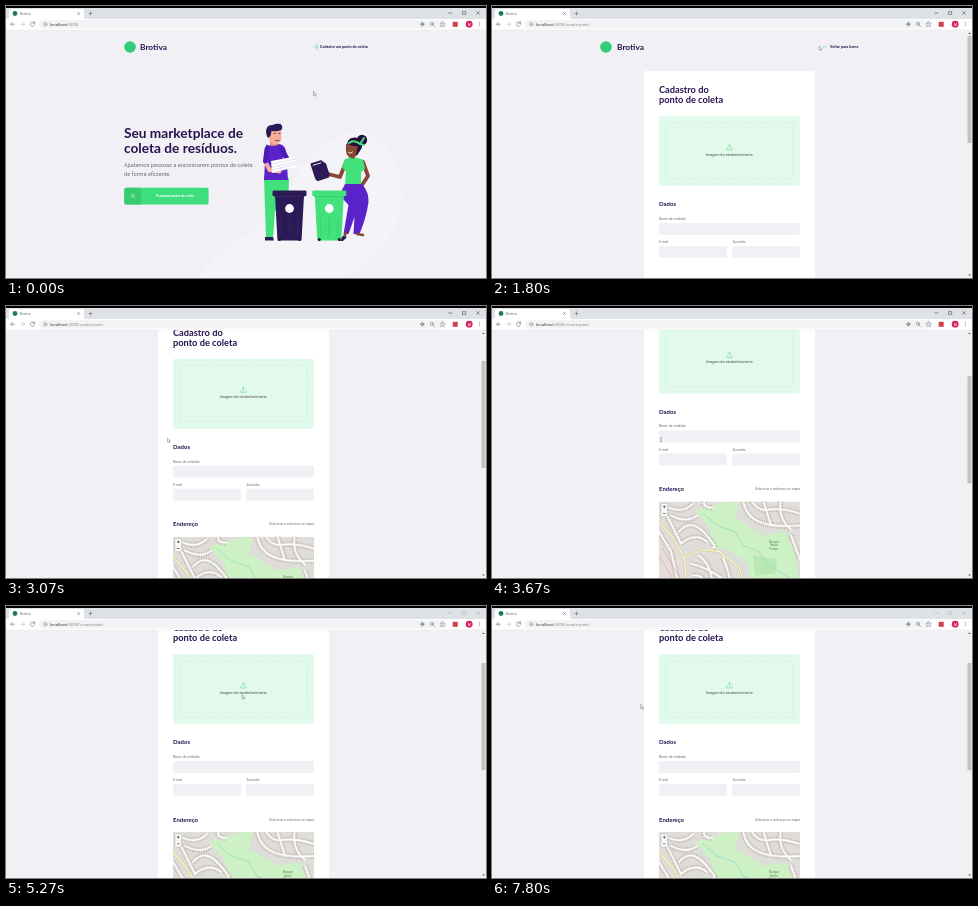
Recreate the animation shown at these times as an HTML page. Size 480 by 272 pixels, loop 8 s.

```html
<!DOCTYPE html>
<html lang="pt-BR">
<head>
<meta charset="utf-8">
<title>Brotiva</title>
<style>
  html, body { margin: 0; width: 100%; height: 100%; overflow: hidden; background: #f0f0f5; }
  #stage { display: block; width: 100%; height: 100%; }
  text { font-family: Roboto, sans-serif; }
  .title, .title text { font-family: Lato, sans-serif; font-weight: 700; fill: #27134f; }
  .label { font-size: 3.3px; fill: #6c6c80; }
  .link { font-size: 3.7px; font-weight: 700; fill: #322153; }
  .line { fill: none; stroke-linecap: round; stroke-linejoin: round; }
  .field { fill: #f0f0f5; }
</style>
</head>
<body>
<svg id="stage" viewBox="0 0 480 272">
  <rect width="480" height="272" fill="#f0f0f5"/>

  <g id="home">
    <path d="M194 272C205 245 240 236 265 205S305 132 352 126C385 128 405 175 392 215C380 245 352 262 338 272Z" fill="#f4f4f8"/>
    <circle cx="124" cy="41" r="5.8" fill="#34cb79"/>
    <text class="title" x="134" y="44" font-size="8.3">Brotiva</text>
    <path class="line" d="M307.5 41h3.5m-1.3-1.3 1.3 1.3-1.3 1.3M310 38.7h1.8v4.6H310" stroke="#6fd8a0" stroke-width=".5"/>
    <text class="link" x="314" y="42.3">Cadastre um ponto de coleta</text>
    <g class="title" font-size="13.7">
      <text x="118" y="132.4">Seu marketplace de</text>
      <text x="118" y="146.8">coleta de resíduos.</text>
    </g>
    <g font-size="5.63" fill="#6c6c80">
      <text x="118" y="161">Ajudamos pessoas a encontrarem pontos de coleta</text>
      <text x="118" y="170">de forma eficiente.</text>
    </g>
    <rect x="118.3" y="181.8" width="84.3" height="16.6" rx="2" fill="#3fde7c"/>
    <path d="M120.3 181.8H135v16.6h-14.7a2 2 0 0 1-2-2v-12.6a2 2 0 0 1 2-2" fill="#39cb70"/>
    <g class="line" stroke="#e4fbee" stroke-width=".5"><circle cx="126.4" cy="189.7" r="1.4"/><path d="m127.5 190.8 1.2 1.2"/></g>
    <text x="169" y="191.3" font-size="3.1" font-weight="700" fill="#fff" text-anchor="middle">Pesquisar pontos de coleta</text>

    <g id="man">
      <path d="M258 172h25l-1 32-13 1-2 27h-7Z" fill="#43e17b"/>
      <path d="M259 231h8l1 3.5h-9Z" fill="#2c1a56"/>
      <path d="M264 132h8v9h-8Z" fill="#e8937f"/>
      <path d="M262 123q6-3 13 0l.5 10q-2 6-6 5.500-5-.5-6.500-6.500Z" fill="#f8ae98"/>
      <path d="M262 132q-3-5-1.500-9 1-4 6-4 4-2 8-1 3 2 1 6-5 2-10 1l-1 5Z" fill="#2c1a56"/>
      <path class="line" d="m268 127.500 1.500-.2m3 0 1.500 .1m-4.500 7q2 1 3.500 0" stroke="#2c1a56" stroke-width=".7"/>
      <path d="M260 138.500q8 3 13-.5 6 1 7 7l2 29h-24l1-18Z" fill="#5a22c9"/>
      <path class="line" d="m259.500 156 4 8 10 1.500m5-14 8 7" stroke="#f8ae98" stroke-width="4"/>
      <path class="line" d="m261 143-1.500 12m16-12 5 9" stroke="#4f1bb7" stroke-width="5"/>
      <path d="m265 155 24-4.500 3 10-26 6.500Z" fill="#fff"/>
      <path class="line" d="m266 158 24-5m-24 8 25-5m-25 8 25-6" stroke="#bfc3df" stroke-width=".5"/>
    </g>

    <g id="woman">
      <circle cx="356" cy="134" r="5.2" fill="#24113f"/>
      <path d="M341 142q-1-11 8-10.500 9 .5 7 10l-5 8h-5Z" fill="#24113f"/>
      <path d="M342 138q5 3 10 2l-2 8-2 7h-4.500l-.5-4q-4-2-3-13Z" fill="#874934"/>
      <path class="line" d="M343 137q5-4 11 1l4-6m-4 6 4 1" stroke="#43e17b" stroke-width="2"/>
      <path class="line" d="M342.500 146.500q2 2 4-.5" stroke="#fff" stroke-width=".9"/>
      <path class="line" d="m340 156-6 15-12-3m35-12 5 14-6 9" stroke="#874934" stroke-width="3.8"/>
      <path d="m339 153 5-1.500q3 2 6 0l7 2 2 9-4 4v14h-16l1-15-4-4Z" fill="#43e17b"/>
      <path d="M339 178h17q7 8 6.500 18-2 15-9 32h-6l1-17-6 17h-5l5-29-9-10Z" fill="#5a22c9"/>
      <path class="line" d="m340 227-2 4m13-3 6 1" stroke="#874934" stroke-width="2.600"/>
      <path d="m337 230 4 1-4 4h-5Z" fill="#2c1a56"/>
      <g transform="rotate(-18 314 165)" fill="#2c1a56">
        <rect x="307" y="158" width="15" height="16" rx="3"/>
        <path class="line" d="M308 160v-4h10l3 5" stroke="#2c1a56" stroke-width="2"/>
      </g>
    </g>
    <g id="bins"></g>
  </g>

  <g id="form">
    <path class="line" d="M40 24Q75 90 52 180T85 272M360 30Q395 110 375 175T430 272" stroke="#f3f3f7" stroke-width=".6"/>
    <g id="page">
      <circle cx="114" cy="41" r="5.8" fill="#34cb79"/>
      <text class="title" x="125" y="44" font-size="8.3">Brotiva</text>
      <path class="line" d="M334.500 41h-3.400m1.500-1.500-1.500 1.500 1.500 1.500" stroke="#6fd8a0" stroke-width=".5"/>
      <text class="link" x="338" y="42.3">Voltar para home</text>

      <rect x="152" y="65" width="171" height="500" rx="2" fill="#fff"/>
      <g class="title" font-size="9.25">
        <text x="167" y="87.4">Cadastro do</text>
        <text x="167" y="97">ponto de coleta</text>
      </g>
      <rect x="167" y="110" width="141" height="70" rx="2" fill="#e1faec"/>
      <rect x="174" y="117" width="127" height="56" rx="2" fill="none" stroke="#96e2b8" stroke-width=".3" stroke-dasharray="1.2 .7"/>
      <path class="line" d="M235 142v2h5v-2m-2.500 .5v-3.800m-1.400 1.400 1.400-1.400 1.400 1.400" stroke="#4ecb79" stroke-width=".45"/>
      <text x="237.3" y="149.8" font-size="3.7" fill="#444" text-anchor="middle">Imagem do estabelecimento</text>

      <g class="title" font-size="6">
        <text x="167" y="200.4">Dados</text>
        <text x="167" y="277.6">Endereço</text>
      </g>
      <g class="label">
        <text x="167" y="213.9">Nome da entidade</text>
        <text x="167" y="237.2">E-mail</text>
        <text x="240.4" y="237.2">Zunovibe</text>
        <text x="308" y="276.6" text-anchor="end">Selecione o endereço no mapa</text>
      </g>
      <rect class="field" x="167" y="217" width="141" height="11.7" rx="1.5"/>
      <rect class="field" x="167" y="240" width="68" height="11.7" rx="1.5"/>
      <rect class="field" x="240" y="240" width="68" height="11.7" rx="1.5"/>

      <svg x="167" y="288" width="141" height="84" overflow="hidden">
        <rect width="141" height="84" fill="#dfddd9"/>
        <path d="M0 44 12 38 36 84H0Z" fill="#e6dcd9"/>
        <path d="M36 10 62 2 70 0H80L76 16 92 26 104 34 126 30 136 50 141 84H92L88 62 72 50 56 46 50 26Z" fill="#cdf0c4"/>
        <path d="M94 54 118 58 116 72 96 74Z" fill="#b9e8b2"/>
        <g id="streets" class="line"></g>
        <path class="line" d="M44 12 58 24 76 30 84 44 100 50 108 62 130 76" stroke="#8fdccb" stroke-width=".8"/>
        <g class="line">
          <path id="avenue" d="M-2 18 14 36 25 56 28 84M25 56 44 48 60 50 80 66 86 84" stroke="#cfcaa0" stroke-width="2.2"/>
          <use href="#avenue"/>
          <path d="M-2 18 14 36 25 56 28 84M25 56 44 48 60 50 80 66 86 84" stroke="#f5f3c8" stroke-width="1.5"/>
        </g>
        <path class="line" d="M0 54 18 84M3 46 23 80" stroke="#c7a9a8" stroke-width=".6"/>
        <g font-size="3" fill="#4d8a55" text-anchor="middle">
          <text x="115" y="41">Bosque</text><text x="115" y="44.500">Norte</text><text x="115" y="48">Parque</text>
        </g>
        <rect x="2" y="2" width="6.6" height="13" rx="1" fill="#fff" stroke="#aaa" stroke-width=".5"/>
        <path class="line" d="M2 8.500h6.600" stroke="#ccc" stroke-width=".3"/>
        <path class="line" d="M4.200 5.200h2.200m-1.100-1.100v2.200M4.200 11.800h2.200" stroke="#222" stroke-width=".6"/>
      </svg>
    </g>
    <rect x="475" y="24" width="5" height="248" fill="#f1f1f1"/>
    <rect id="thumb" x="475.5" width="4" height="107" fill="#c1c1c1"/>
    <path d="m476.200 28 1.300-1.600 1.300 1.600Zm0 240.500 1.300 1.600 1.300-1.600Z" fill="#505050"/>
  </g>

  <g id="browser">
    <rect width="480" height="13" fill="#dee1e6"/>
    <rect width="480" height="2" fill="#000"/>
    <path d="M1 13q2 0 2-2V5q0-2 2-2h71q2 0 2 2v6q0 2 2 2Z" fill="#fff"/>
    <circle cx="9" cy="7.5" r="2.4" fill="#1c7d55"/>
    <text x="14" y="8.9" font-size="3.4" fill="#6a6d71">Brotiva</text>
    <path class="line" d="m71.500 6.500 2 2m0-2-2 2M82.800 7.500h3.400m-1.700-1.700v3.400" stroke="#55585c" stroke-width=".5"/>
    <path id="controls" class="line" d="M442.700 7h3.200m11-1.400h2.800v2.800h-2.800Zm13.800 0 2.800 2.800m0-2.800-2.800 2.800" stroke-width=".5"/>
    <rect y="13" width="480" height="11" fill="#fff"/>
    <path d="M0 24h480" stroke="#dfe1e4" stroke-width=".4"/>
    <rect x="33" y="14" width="408" height="8.6" rx="4.3" fill="#f1f3f4"/>
    <g class="line" stroke="#5f6368" stroke-width=".55">
      <path d="M8.600 18.200H4.700m1.800-1.800-1.800 1.800 1.800 1.800"/>
      <path d="M14.700 18.200h3.900m-1.800-1.800 1.800 1.800-1.800 1.800" stroke="#b5b7ba"/>
      <path d="M28.400 17a2.200 2.200 0 1 0 .2 1.800m0-3v1.600H27"/>
      <circle cx="39.2" cy="18.2" r="1.7" stroke-width=".4"/><path d="M39.200 18v1" stroke-width=".4"/>
      <circle cx="416.3" cy="18.2" r="1.4"/><path d="M416.300 16v4.400m-2.200-2.200h4.400" stroke-width=".4"/>
      <circle cx="425.8" cy="17.8" r="1.5"/><path d="m427 19 1.400 1.400"/>
      <path d="m436.400 15.800.8 1.600 1.700.2-1.300 1.200.4 1.700-1.600-.9-1.600.9.4-1.700-1.300-1.200 1.700-.2Z" stroke-width=".4"/>
    </g>
    <text x="44" y="19.8" font-size="4.3" fill="#3c4043">localhost<tspan fill="#8a8e93">:3000<tspan id="route">/create-point</tspan></tspan></text>
    <rect x="446.7" y="15.8" width="5" height="5" fill="#d0404c"/>
    <circle cx="463.2" cy="18.2" r="3.4" fill="#d81f5e"/>
    <text x="463.2" y="19.6" font-size="3.6" fill="#fff" text-anchor="middle">M</text>
    <path class="line" d="M473.300 16.300v4" stroke="#5f6368" stroke-width=".8" stroke-dasharray="0 1.7"/>
  </g>

  <g id="cursor" stroke="#555" stroke-width=".5">
    <path id="arrow" d="M0 0v5l1.200-1 .9 2 .9-.4-.9-1.900h1.600Z" fill="#fff"/>
    <path id="hand" d="M-.6 0h1v2.200l2 .5v2l-.6 1.300h-2.400L-2 3.800l.5-.5.9.6Z" fill="#fff"/>
    <path id="beam" class="line" d="M-.8 0h1.600M0 0v4.600m-.8 0h1.600"/>
  </g>
</svg>

<script>
const LOOP = 8000;
const byId = id => document.getElementById(id);
const show = (id, visible) => byId(id).style.display = visible ? '' : 'none';

// The two bins share one shape.
byId('bins').innerHTML = [[266.5, '#2c1a56', '#38246a'], [306.3, '#43e17b', '#38cc6c']].map(([x, main, shade]) => `
  <g transform="translate(${x} 184.5)">
    <path d="M2.500 5h29l-2.500 45H5Z" fill="${main}"/>
    <path class="line" d="m8 28 1 18m8-18v18m9-18-1 18" stroke="${shade}" stroke-width=".8"/>
    <rect width="34" height="5.6" rx="1.2" fill="${main}"/>
    <path d="M2 6h30" stroke="${shade}"/>
    <circle cx="17" cy="18" r="4.4" fill="#fff"/>
    <circle cx="7" cy="49" r="1.5" fill="#24113f"/><circle cx="27" cy="49" r="1.5" fill="#24113f"/>
  </g>`).join('');

// Streets: a dashed band of houses, a verge, then the roadway.
const streets = `M10 6Q24 12 34 2M12 14Q28 22 38 14M20 30Q32 16 46 32T54 46
  M22 42Q36 30 48 40M4 6 22 42M84 -2Q86 14 100 20T141 24M92 -2Q98 10 110 8T141 12
  M104 -2 112 24M122 -2Q118 16 132 28M40 54Q52 62 54 84M32 62Q48 66 62 76M0 30 12 50 20 84
  M46 -2Q42 6 54 6M64 56Q70 70 72 84M132 34 141 58M34 74Q44 72 46 84`;
byId('streets').innerHTML = [
  ['#c4b6ad', 6, '.9 1.2'], ['#dfddd9', 2.5, ''], ['#fff', 1.3, '']
].map(([color, width, dash]) =>
  `<path d="${streets}" stroke="${color}" stroke-width="${width}" stroke-dasharray="${dash}" ${dash && 'stroke-linecap="butt"'}/>`
).join('');

const linear = k => k;
const smooth = k => k * k * (3 - 2 * k);

// Each key is [time, ...values]; returns the values at the given time.
function sample(keys, time, ease) {
  const next = keys.findIndex(key => key[0] > time);
  if (next === 0) return keys[0].slice(1);
  if (next < 0) return keys[keys.length - 1].slice(1);
  const from = keys[next - 1], to = keys[next];
  const k = ease((time - from[0]) / (to[0] - from[0]));
  return from.slice(1).map((value, i) => value + (to[i + 1] - value) * k);
}

const scrollKeys = [
  [2840, 0], [2930, 20], [3070, 57.3], [3200, 85], [3290, 92.4],
  [3710, 92.4], [3800, 78], [3900, 65], [3960, 62]
];
const cursorKeys = [
  [20, 307.5, 85.5], [870, 331, 47], [930, 331, 47], [1200, 327, 40],
  [1960, 327, 40], [2800, 161.5, 132], [3300, 161.5, 132], [3670, 169, 132],
  [3800, 169, 132], [4470, 231, 82], [5040, 231, 82], [5270, 236, 88.5],
  [5840, 236, 88.5], [6050, 255, 108], [6350, 215, 132], [6670, 163, 78],
  [7500, 163, 78], [7600, 160, 65], [7800, 148.7, 98.5]
];

function render(time) {
  const onForm = time >= 1670;
  show('home', !onForm);
  show('form', onForm);
  show('route', onForm);

  const [scroll] = sample(scrollKeys, time, linear);
  byId('page').setAttribute('transform', `translate(0 ${-scroll})`);
  byId('thumb').setAttribute('y', 30 + scroll * 0.435);

  // The window loses focus once the file picker has been opened.
  byId('controls').setAttribute('stroke', time >= 4600 ? '#aaa' : '#333');

  const [x, y] = sample(cursorKeys, time, smooth);
  byId('cursor').setAttribute('transform', `translate(${x} ${y}) scale(.8)`);
  const beam = time >= 3500 && time < 3800;
  const hand = (time >= 800 && time < 1670) || (time >= 3960 && time < 4600);
  show('beam', beam);
  show('hand', hand);
  show('arrow', !beam && !hand);
}

let start;
function tick(now) {
  start ??= now;
  render((now - start) % LOOP);
  requestAnimationFrame(tick);
}
render(0);
requestAnimationFrame(tick);
</script>
</body>
</html>
```
